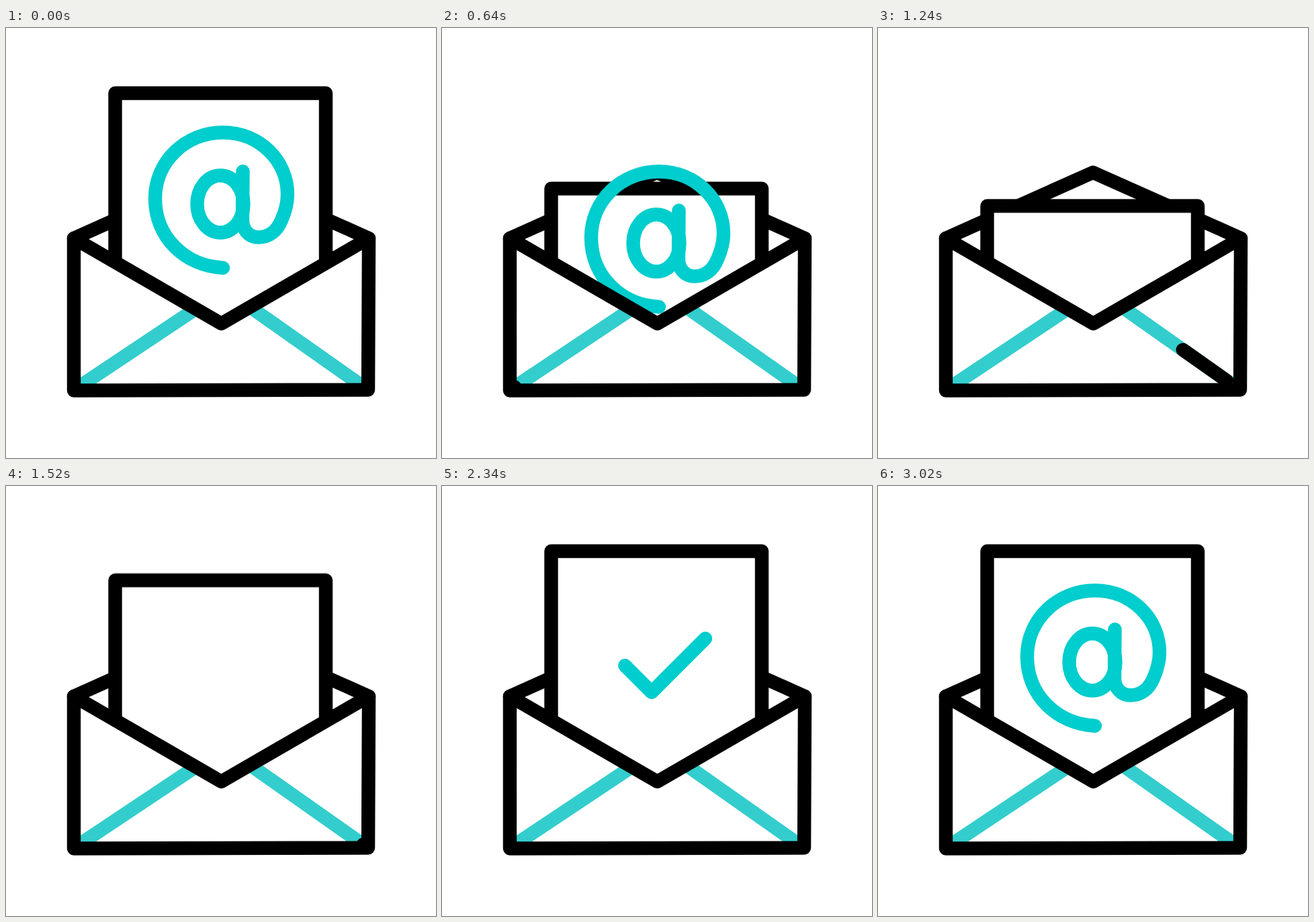
An HTML page for the animation above (3600 ms loop, 640x640 px).

```html
<!DOCTYPE html>
<html lang="en">
<head>
<meta charset="utf-8">
<title>Envelope</title>
<style>
  @property --from { syntax: "<number>"; inherits: true; initial-value: 0; }
  @property --to { syntax: "<number>"; inherits: true; initial-value: 1; }

  html, body { margin: 0; width: 100%; height: 100%; overflow: hidden; background: #fff; }
  svg { display: block; width: 100vw; height: 100vh; }

  :root {
    --smooth: cubic-bezier(.333, 0, .667, 1);
    --sharp: cubic-bezier(.89, 0, .11, 1);
  }

  path, polyline, polygon {
    fill: none;
    stroke: #000;
    stroke-width: 20.4px;
    stroke-linecap: round;
    stroke-linejoin: round;
  }
  .white { fill: #fff; }
  .bare { stroke: none; }
  .fold { stroke: #33cdcd; }
  .mark path { stroke: #00cdcd; }

  .paper, .at, .check, .runner {
    animation-duration: 3.6s;
    animation-iteration-count: infinite;
    animation-timing-function: linear;
  }

  /* Shows the part of a path between --from and --to (pathLength is 1). */
  .trim {
    stroke-dasharray: calc((var(--to) - var(--from)) * 1px) 3px;
    stroke-dashoffset: calc(var(--from) * -1px);
  }

  .paper { animation-name: paper; }
  @keyframes paper {
    0% { transform: none; }
    7.778% { transform: translateY(0); animation-timing-function: var(--sharp); }
    26.111% { transform: translateY(168px); }
    34.417% { transform: translateY(168px); animation-timing-function: var(--smooth); }
    52.028%, 100% { transform: translateY(0); }
  }

  .at { animation-name: at-drop, at-draw, at-show; }
  @keyframes at-drop {
    0% { transform: translateY(0); }
    7.778% { transform: translateY(0); animation-timing-function: cubic-bezier(.784, 0, .4, 1); }
    30.944% { transform: translateY(300px); animation-timing-function: step-end; }
    50%, 100% { transform: translateY(0); }
  }
  @keyframes at-draw {
    0% { --to: 1; animation-timing-function: step-end; }
    50%, 69.444% { --to: 0; }
    83.889%, 100% { --to: 1; }
  }
  @keyframes at-show {
    0% { opacity: 1; animation-timing-function: step-end; }
    30.944% { opacity: 0; animation-timing-function: step-end; }
    69.5%, 100% { opacity: 1; }
  }

  .check { animation-name: check-from, check-to, check-show; }
  @keyframes check-from {
    0% { --from: .229; }
    44.889% { --from: .229; animation-timing-function: var(--smooth); }
    51.556% { --from: 0; }
    61.972% { --from: 0; animation-timing-function: cubic-bezier(.9, 0, .1, 1); }
    70.028%, 100% { --from: 1; }
  }
  @keyframes check-to {
    0% { --to: .229; }
    44.889% { --to: .229; animation-timing-function: var(--smooth); }
    51.556%, 100% { --to: 1; }
  }
  @keyframes check-show {
    0% { opacity: 0; animation-timing-function: step-end; }
    44.95% { opacity: 1; animation-timing-function: step-end; }
    69.4%, 100% { opacity: 0; }
  }

  .runner { animation-name: run-from, run-to; }
  @keyframes run-from {
    0% { --from: 0; }
    22.583% { --from: 0; animation-timing-function: var(--smooth); }
    46.306%, 100% { --from: 1; }
  }
  @keyframes run-to {
    0% { --to: 0; }
    17.111% { --to: 0; animation-timing-function: var(--smooth); }
    40.806%, 100% { --to: 1; }
  }
</style>
</head>
<body>
<svg viewBox="0 0 640 640">
  <defs>
    <clipPath id="above"><rect width="640" height="445"/></clipPath>
    <clipPath id="pocket"><path d="M101 313L320.500 440L540 313L539 538.500L101 539.500Z"/></clipPath>
  </defs>

  <polyline points="101,313 320,215 540,313"/>

  <g clip-path="url(#above)">
    <g class="paper">
      <path class="white" d="M162.500 800V97H476V800"/>
    </g>
    <g class="mark">
      <g class="at">
        <path class="trim" pathLength="1" d="M323 357C266 354 222 311 222 254C222 199 267 155.500 323 155.500C377 155.500 419 197 419 248C419 262 414 277 410 286C403 303 391 311.500 376 311.500C362 311.500 352 301 352 286L352.500 213.500"/>
        <path class="trim" pathLength="1" d="M319 219.500A34.500 42.500 0 0 0 319 304.500A34.500 42.500 0 0 0 319 219.500"/>
      </g>
      <g class="check">
        <path class="trim" pathLength="1" d="M256 251L312 307L392 227"/>
      </g>
    </g>
  </g>

  <g clip-path="url(#pocket)">
    <rect class="white" y="300" width="640" height="260"/>
    <path class="fold" d="M101 539L326 389L539 539"/>
    <g class="runner">
      <path class="trim" pathLength="1" d="M101 539L326 389L539 539"/>
    </g>
  </g>
  <polygon points="101,313 320.500,440 540,313 539,538.500 101,539.500"/>
</svg>
</body>
</html>
```
